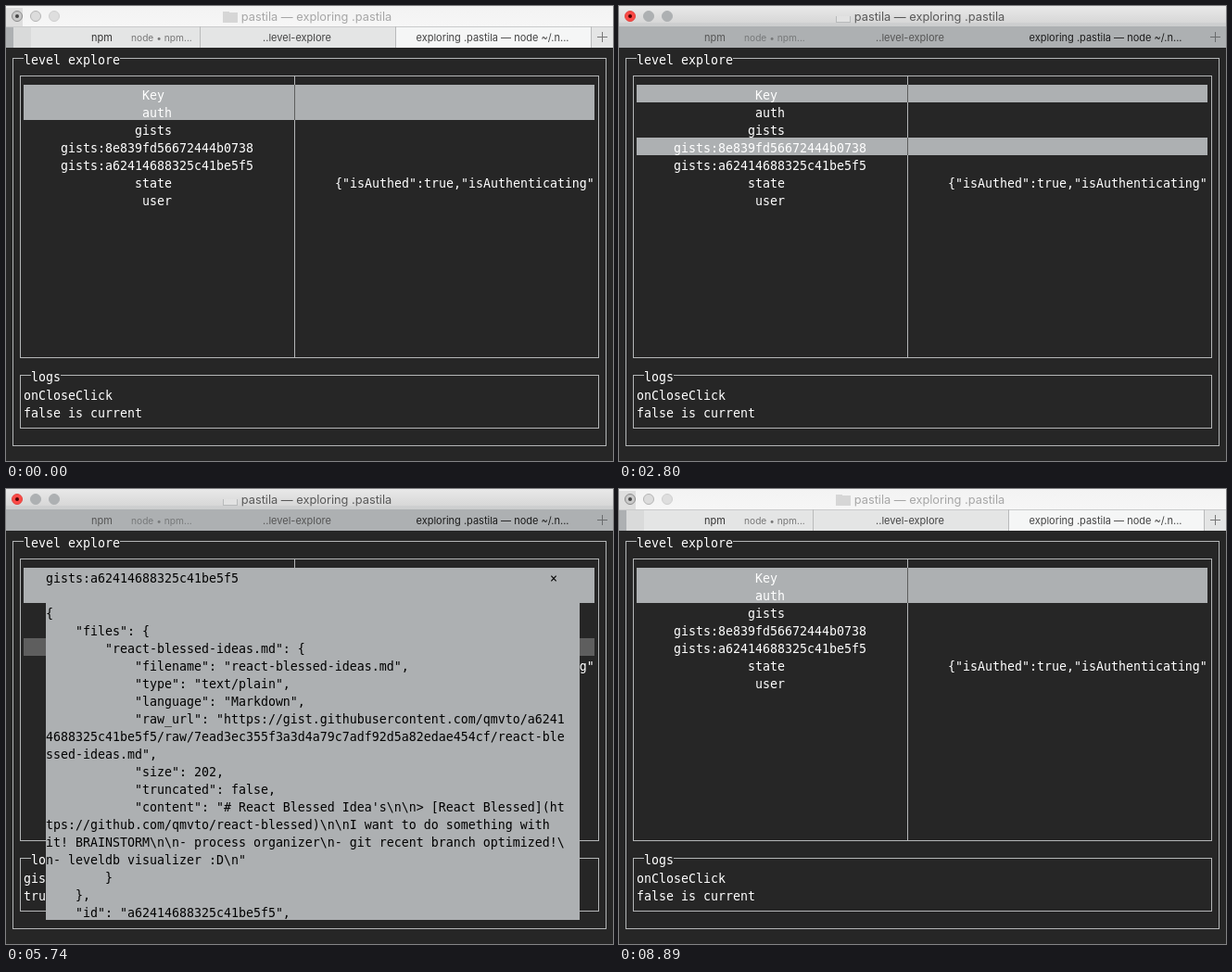
An HTML page with a canvas for the animation above (8.96 s loop, 655 px wide and 491 px high).

```html
<!DOCTYPE html>
<html lang="en">
<head>
<meta charset="utf-8">
<title>level explore</title>
<style>
  html, body { margin: 0; width: 100%; height: 100%; overflow: hidden; background: #262626; }
  canvas { display: block; }
</style>
</head>
<body>
<canvas id="stage" width="655" height="491"></canvas>
<script>
const ctx = document.getElementById('stage').getContext('2d');
const LOOP = 8960, ROW = 19, COL = 8, LEFT = 19, TOP = 85;
const MONO = '13.29px "DejaVu Sans Mono", monospace';
const DARK = '#262626', LIGHT = '#adb0b2', HOVER = '#5e5e5e', LINE = '#b4b6b7';
const CLOSE = 'close';

const keys = ['Key', 'auth', 'gists', 'gists:8e839fd56672444b0738',
  'gists:a62414688325c41be5f5', 'state', 'user'];

const record = String.raw`{
    "files": {
        "react-blessed-ideas.md": {
            "filename": "react-blessed-ideas.md",
            "type": "text/plain",
            "language": "Markdown",
            "raw_url": "https://gist.githubusercontent.com/qmvto/a6241
4688325c41be5f5/raw/7ead3ec355f3a3d4a79c7adf92d5a82edae454cf/react-ble
ssed-ideas.md",
            "size": 202,
            "truncated": false,
            "content": "# React Blessed Idea's\n\n> [React Blessed](ht
tps://github.com/qmvto/react-blessed)\n\nI want to do something with
it! BRAINSTORM\n\n- process organizer\n- git recent branch optimized!\
n- leveldb visualizer :D\n"
        }
    },
    "id": "a62414688325c41be5f5",`.split('\n');

// Each track is a list of [start time, value].
const focusTrack = [[0, false], [980, true], [8890, false]];
const selectTrack = [[0, 1], [2800, 3], [4340, 4], [4550, 1]];
const modalTrack = [[0, false], [4550, true], [7840, false]];
const hoverTrack = [[0, null], [1330, 4], [1400, 3], [2380, null], [3850, 4], [4340, null],
  [5740, 4], [6230, 3], [6300, 2], [6510, 1], [6650, null], [6790, CLOSE], [7490, null]];

const valueAt = (track, t) => track.filter(([start]) => start <= t).pop()[1];

function rect(x, y, w, h, color) {
  ctx.fillStyle = color;
  ctx.fillRect(x, y, w, h);
}

function frame(x, y, w, h) {
  ctx.strokeStyle = LINE;
  ctx.lineWidth = 1;
  ctx.strokeRect(x + .5, y + .5, w, h);
}

function text(str, x, baseline, color, font = MONO, align = 'left') {
  ctx.font = font;
  ctx.textAlign = align;
  ctx.fillStyle = color;
  ctx.fillText(str, x, baseline);
}

function dot(x, y, r, fill, stroke) {
  ctx.beginPath();
  ctx.arc(x, y, r, 0, 7);
  ctx.fillStyle = fill;
  ctx.fill();
  if (stroke) {
    ctx.strokeStyle = stroke;
    ctx.lineWidth = 1;
    ctx.stroke();
  }
}

function titleBar(focused) {
  const shade = ctx.createLinearGradient(0, 0, 0, 22);
  shade.addColorStop(0, focused ? '#e9e9e9' : '#f3f3f3');
  shade.addColorStop(1, focused ? '#d3d3d3' : '#f6f6f6');
  rect(0, 0, 655, 22, shade);
  if (!focused) rect(0, 2, 18, 20, '#dedede');

  dot(12, 11, 5.5, focused ? '#fc4a47' : '#c9c9c9', focused ? '#e0443e' : '#8b8b8b');
  dot(12, 11, 2, focused ? '#4d0000' : '#444');
  dot(32, 11, 5.5, focused ? LIGHT : '#dcdcdc', focused ? LIGHT : '#b5b5b5');
  dot(52, 11, 5.5, focused ? LIGHT : '#dedede', focused ? LIGHT : '#cfcfcf');

  if (focused) {
    rect(234, 11, 16, 7, '#b8babb');
    rect(235, 11, 14, 6, '#e2e2e2');
  } else {
    rect(234, 6, 7, 3, '#d6d6d6');
    rect(234, 7, 16, 11, '#d6d6d6');
  }
  text('pastila — exploring .pastila', 335, 16, focused ? '#585858' : '#a6a6a6',
    '12.8px Inter, sans-serif', 'center');
}

function tabBar(focused) {
  const small = '11px Inter, sans-serif';
  if (focused) {
    rect(0, 18, 655, 4, 'rgba(190,192,194,.35)');
    rect(0, 22, 655, 23, LIGHT);
  } else {
    rect(0, 22, 655, 23, '#e4e5e5');
    rect(0, 22, 8, 23, LIGHT);
    rect(8, 22, 19, 23, '#d9dada');
    rect(421, 22, 210, 23, '#f5f6f6');
    rect(0, 22, 655, 1, '#c9cacb');
    for (const x of [209, 420, 631]) rect(x, 22, 1, 23, '#b9babb');
  }
  text('npm', 92, 38, focused ? '#555' : '#333', small);
  text('node • npm...', 135, 38, focused ? '#77797a' : '#777', '10.2px Inter, sans-serif');
  text('..level-explore', 314, 38, focused ? '#555' : '#444', small, 'center');
  text('exploring .pastila — node ~/.n...', 525, 38, focused ? '#1c1c1c' : '#444', small, 'center');
  const plus = focused ? '#6a6c6d' : '#777';
  rect(638, 33, 11, 1, plus);
  rect(643, 28, 1, 11, plus);
}

function table(selected, hovered) {
  frame(15, 75, 624, 304);
  rect(311, 75, 1, 304, LINE);
  keys.forEach((key, i) => {
    const y = TOP + i * ROW;
    const fill = i === hovered ? HOVER : i === 0 || i === selected ? LIGHT : null;
    if (fill) {
      rect(LEFT, y, 616, ROW, fill);
      rect(311, y, 1, ROW, fill === LIGHT ? '#5e5e5e' : LINE);
    }
    text(key, LEFT + Math.floor((36 - key.length) / 2) * COL, y + 16, '#fff');
  });
  text('{"isAuthed":true,"isAuthenticating"', 355, TOP + 5 * ROW + 16, '#fff');
}

function logs(lines) {
  frame(15, 398, 624, 57);
  rect(27, 398, 32, 1, DARK);
  text('logs', 27, 405, '#fff');
  lines.forEach((line, i) => text(line, LEFT, 425 + i * ROW, '#fff'));
}

function modal(closeHovered) {
  rect(43, TOP, 576, 380, LIGHT);
  text(keys[4], 43, TOP + 16, '#000');
  if (closeHovered) rect(587, TOP, 24, ROW, HOVER);
  text('×', 587, TOP + 16, '#000');
  record.forEach((line, i) => text(line, 43, TOP + (i + 2) * ROW + 16, '#000'));
}

function draw(t) {
  const focused = valueAt(focusTrack, t);
  const hovered = valueAt(hoverTrack, t);
  const open = valueAt(modalTrack, t);

  rect(0, 0, 655, 491, DARK);
  titleBar(focused);
  tabBar(focused);
  frame(7, 56, 640, 418);
  rect(19, 56, 104, 1, DARK);
  text('level explore', LEFT, 63, '#fff');
  table(valueAt(selectTrack, t), hovered);
  logs(open ? [keys[4], 'true is current'] : ['onCloseClick', 'false is current']);
  if (open) modal(hovered === CLOSE);
}

const start = performance.now();
function tick() {
  draw((performance.now() - start) % LOOP);
  requestAnimationFrame(tick);
}
tick();
</script>
</body>
</html>
```
